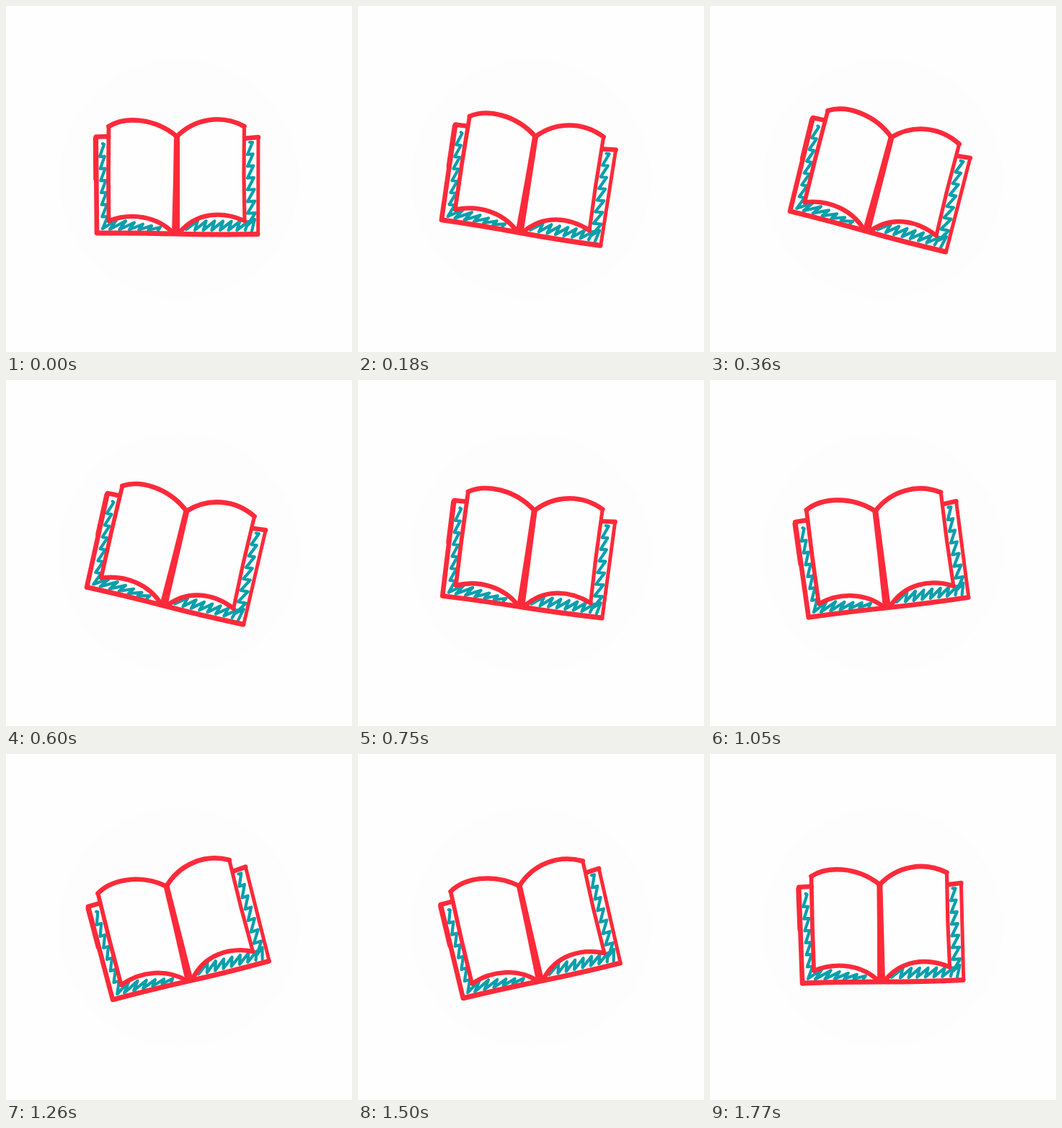
These frames come from a looping animation (480x480 px, 1.8 s). An HTML page with a canvas:

```html
<!DOCTYPE html>
<html lang="en">
<head>
<meta charset="utf-8">
<title>Rocking book</title>
<style>
html, body { margin: 0; width: 100%; height: 100%; overflow: hidden; background: #fefefe; }
canvas { display: block; width: 480px; height: 480px; }
</style>
</head>
<body>
<canvas id="stage" width="480" height="480"></canvas>
<script>
const ctx = document.getElementById('stage').getContext('2d');
const RED = '#fe2a3a', TEAL = '#0a9fac', PAPER = '#fefefe';
const LOOP = 1800, STEP = 30, SWING = 15 * Math.PI / 180;

const backing = new Path2D('M125 182L350 182L350 316L126 315Z');
const leftPage = new Path2D('M142.5 167C165 153 206 155 237 181L236 315C210 292 174 286 143 298Z');
const rightPage = new Path2D('M237 181C262 156 299 150 330.5 167L331 298C300 284 264 286 236 315Z');

// Pen stroke bouncing n times between two edges, each given as x1, y1, x2, y2
function zigzag(path, n, a, b) {
  const at = (e, k) => path.lineTo(e[0] + (e[2] - e[0]) * k, e[1] + (e[3] - e[1]) * k);
  for (let i = 0; i < n; i++) {
    at(a, i / (n - 1));
    at(b, i / (n - 1));
  }
}

const hatch = new Path2D();
hatch.moveTo(134, 191);
zigzag(hatch, 7, [136, 192, 141, 292], [130, 209, 134, 309]);
zigzag(hatch, 6, [154, 296, 214, 307], [144, 310, 211, 311]);
hatch.moveTo(338, 189);
zigzag(hatch, 7, [342, 189, 346, 287], [335, 206, 335, 304]);
hatch.lineTo(345, 296);
hatch.lineTo(341, 312);
hatch.moveTo(250, 310);
zigzag(hatch, 7, [266, 298, 336, 299], [262, 311, 332, 311]);

// width, path
const outlines = [
  [6.5, 'M142 181L125 181.5'],
  [6.6, 'M124.8 182L126 315'],
  [6.5, 'M124 184L124.5 240'],
  [7, 'M127 315Q185 314.5 236 316T349 316.5'],
  [5, 'M349.7 316L350 182'],
  [6.5, 'M350 182L333 183.5'],
  [6.6, 'M142.5 167C165 153 206 155 237 181'],
  [6.6, 'M237 181C262 156 299 150 330.5 167'],
  [5.8, 'M142.5 167L142 235L142.5 298'],
  [5.2, 'M330.5 167L330 235L331 298'],
  [6.3, 'M143 298C174 286 210 292 232 315'],
  [6.3, 'M331 298C300 284 264 286 240 315']
].map(([w, d]) => [w, new Path2D(d)]);

const spine = new Path2D('M233 180Q237 176 241 180L241 225L241 317L230 317L232 240Z');

function line(path, color, width) {
  ctx.strokeStyle = color;
  ctx.lineWidth = width;
  ctx.stroke(path);
}

function fill(path, color) {
  ctx.fillStyle = color;
  ctx.fill(path);
}

function draw(t) {
  ctx.fillStyle = PAPER;
  ctx.fillRect(0, 0, 480, 480);
  ctx.fillStyle = '#fdfdfd';
  ctx.beginPath();
  ctx.arc(240, 240, 166, 0, Math.PI * 2);
  ctx.fill();

  ctx.save();
  ctx.translate(240, 240);
  ctx.rotate(SWING * Math.sin(t / LOOP * Math.PI * 2));
  ctx.translate(-240, -240);
  ctx.lineCap = ctx.lineJoin = 'round';
  fill(backing, PAPER);
  line(hatch, TEAL, 4.2);
  fill(leftPage, PAPER);
  fill(rightPage, PAPER);
  outlines.forEach(([w, p]) => line(p, RED, w));
  fill(spine, RED);
  ctx.restore();
}

let start;
function tick(now) {
  if (start === undefined) start = now;
  draw(Math.floor(((now - start) % LOOP) / STEP) * STEP);
  requestAnimationFrame(tick);
}
draw(0);
requestAnimationFrame(tick);
</script>
</body>
</html>
```
